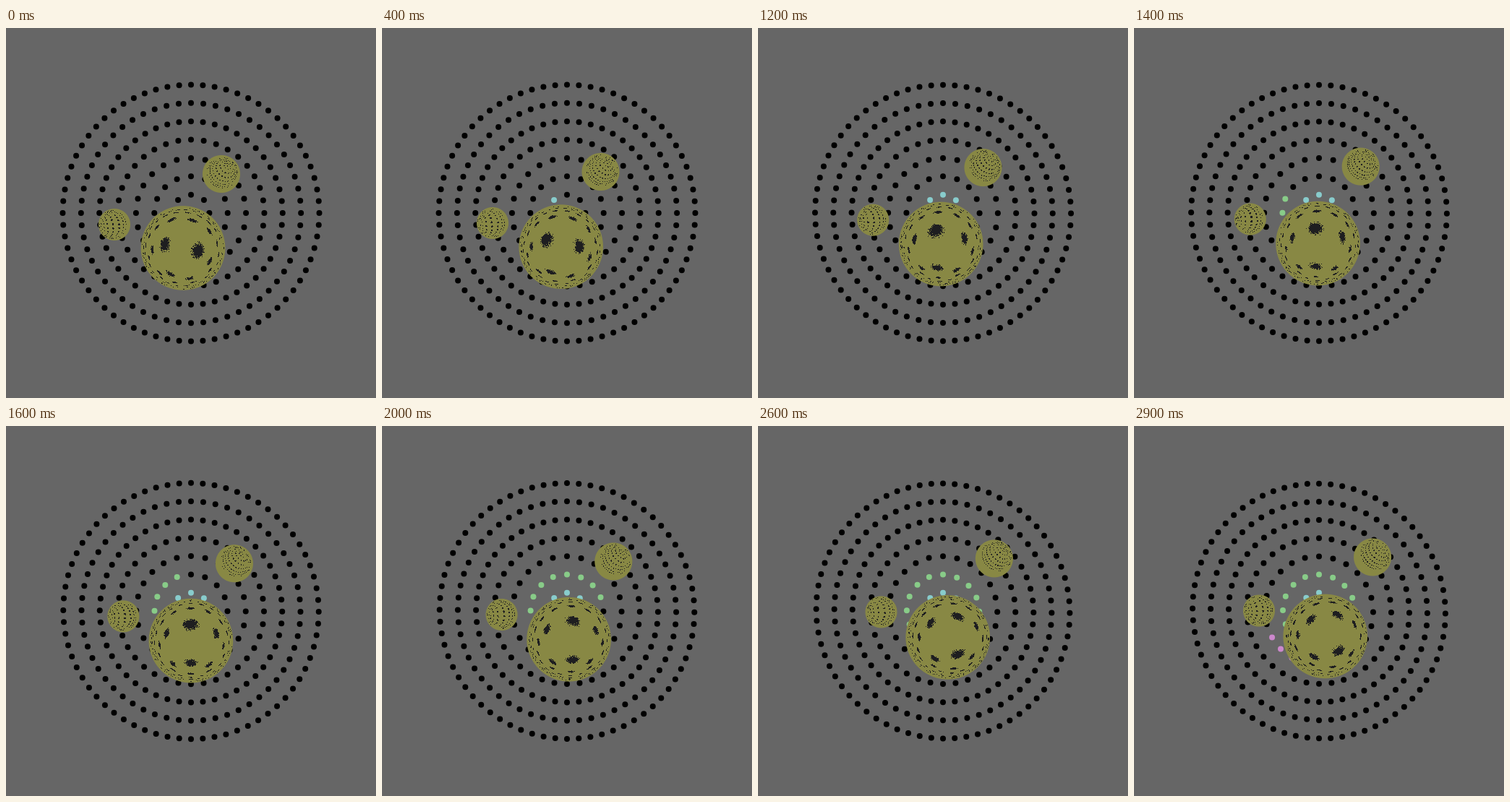
These frames come from a looping animation (512 by 512 pixels, 3000 ms). An HTML page with a canvas:

```html
<!DOCTYPE html>
<html>
<head>
<meta charset="utf-8">
<style>
  html, body { margin: 0; width: 100%; height: 100%; overflow: hidden; background: #666; }
  canvas { display: block; width: 512px; height: 512px; }
</style>
</head>
<body>
<canvas id="stage" width="512" height="512"></canvas>
<script>
const SIZE = 512, MID = 256;
const STEP_MS = 100, STEPS = 30;
const RING_GAP = 25.36, DOT = 4;
const RING_COUNTS = [1, 8, 16, 24, 36, 48, 56, 68];
const LIT_COLORS = ['#000', '#88cccc', '#88cc88', '#cc88cc'];
const GLASS = [136, 136, 68], SHADE = [30, 30, 32];
const REFRACTION = 1.5;

// Glass balls floating above the dotted plane z = 0.
const BALLS = [
  { x: -106, y: 16, z: 126, r: 22 },
  { x: 42, y: -54, z: 192, r: 26 },
  { x: -11, y: 48.5, z: 115, r: 58.3 }
];

const ctx = document.getElementById('stage').getContext('2d', { willReadFrequently: true });

// Orthographic camera, yawed and pitched around the plane's centre.
function makeCamera(yaw, pitch) {
  const ca = Math.cos(yaw), sa = Math.sin(yaw);
  const cb = Math.cos(pitch), sb = Math.sin(pitch);
  return {
    project(x, y, z) {
      const depth = z * ca - x * sa;
      return [MID + x * ca + z * sa, MID + y * cb - depth * sb];
    },
    toWorld(x, y, z) {
      const depth = z * cb - y * sb;
      return [x * ca - depth * sa, y * cb + z * sb, x * sa + depth * ca];
    }
  };
}

function grain(x, y, seed) {
  const v = Math.sin(x * 12.9898 + y * 78.233 + seed * 37.719) * 43758.5453;
  return v - Math.floor(v);
}

function drawDots(camera, step) {
  let lit = step;
  for (let ring = 0; ring < RING_COUNTS.length; ring++) {
    const count = RING_COUNTS[ring], radius = ring * RING_GAP;
    for (let i = 0; i < count; i++) {
      const angle = i / count * Math.PI * 2;
      const [x, y] = camera.project(-radius * Math.sin(angle), radius * Math.cos(angle), 0);
      ctx.fillStyle = ring > 0 && lit-- > 0 ? LIT_COLORS[ring] : '#000';
      ctx.beginPath();
      ctx.arc(x, y, DOT, 0, Math.PI * 2);
      ctx.fill();
    }
  }
}

function distanceToDot(x, y) {
  const radius = Math.hypot(x, y);
  const ring = Math.round(radius / RING_GAP);
  if (ring >= RING_COUNTS.length) return Infinity;
  const slice = Math.PI * 2 / RING_COUNTS[ring];
  const angle = Math.round(Math.atan2(-x, y) / slice) * slice;
  const dotRadius = ring * RING_GAP;
  return Math.hypot(x + dotRadius * Math.sin(angle), y - dotRadius * Math.cos(angle));
}

// Where a view ray lands on the plane after passing through the ball.
function traceThrough(camera, ball, nx, ny) {
  const rho = Math.hypot(nx, ny) || 1e-6;
  const incoming = Math.asin(Math.min(rho, 1));
  const inside = Math.asin(Math.min(rho, 1) / REFRACTION);
  const bend = 2 * (incoming - inside), exit = 2 * inside - incoming;
  const ux = nx / rho, uy = ny / rho;
  const from = camera.toWorld(ux * Math.sin(exit), uy * Math.sin(exit), -Math.cos(exit));
  const dir = camera.toWorld(-ux * Math.sin(bend), -uy * Math.sin(bend), -Math.cos(bend));
  if (dir[2] > -0.01) return null;
  const length = (ball.z + from[2] * ball.r) / -dir[2];
  return [
    ball.x + from[0] * ball.r + dir[0] * length,
    ball.y + from[1] * ball.r + dir[1] * length
  ];
}

function drawBall(camera, ball) {
  const [cx, cy] = camera.project(ball.x, ball.y, ball.z);
  const left = Math.floor(cx - ball.r) - 1, top = Math.floor(cy - ball.r) - 1;
  const side = Math.ceil(ball.r * 2) + 3;
  const image = ctx.getImageData(left, top, side, side);
  for (let py = 0; py < side; py++) {
    for (let px = 0; px < side; px++) {
      const dx = left + px + 0.5 - cx, dy = top + py + 0.5 - cy;
      const cover = Math.min(1, ball.r + 0.5 - Math.hypot(dx, dy));
      if (cover <= 0) continue;
      const hit = traceThrough(camera, ball, dx / ball.r, dy / ball.r);
      let color = GLASS;
      if (hit) {
        const blur = (grain(px, py, 1) + grain(px, py, 2) - 1) * 1.8;
        if (distanceToDot(hit[0], hit[1]) + blur < DOT) color = SHADE;
      }
      const at = (py * side + px) * 4;
      for (let c = 0; c < 3; c++) {
        image.data[at + c] += (color[c] - image.data[at + c]) * cover;
      }
    }
  }
  ctx.putImageData(image, left, top);
}

function draw(step) {
  const progress = step / 29;
  const camera = makeCamera(0.171 * progress, 0.115 * progress);
  ctx.fillStyle = '#666';
  ctx.fillRect(0, 0, SIZE, SIZE);
  drawDots(camera, step);
  for (const ball of BALLS) drawBall(camera, ball);
}

let shown = -1;
const start = performance.now();
function tick() {
  const step = Math.floor((performance.now() - start) / STEP_MS) % STEPS;
  if (step !== shown) draw(shown = step);
  requestAnimationFrame(tick);
}
tick();
</script>
</body>
</html>
```
